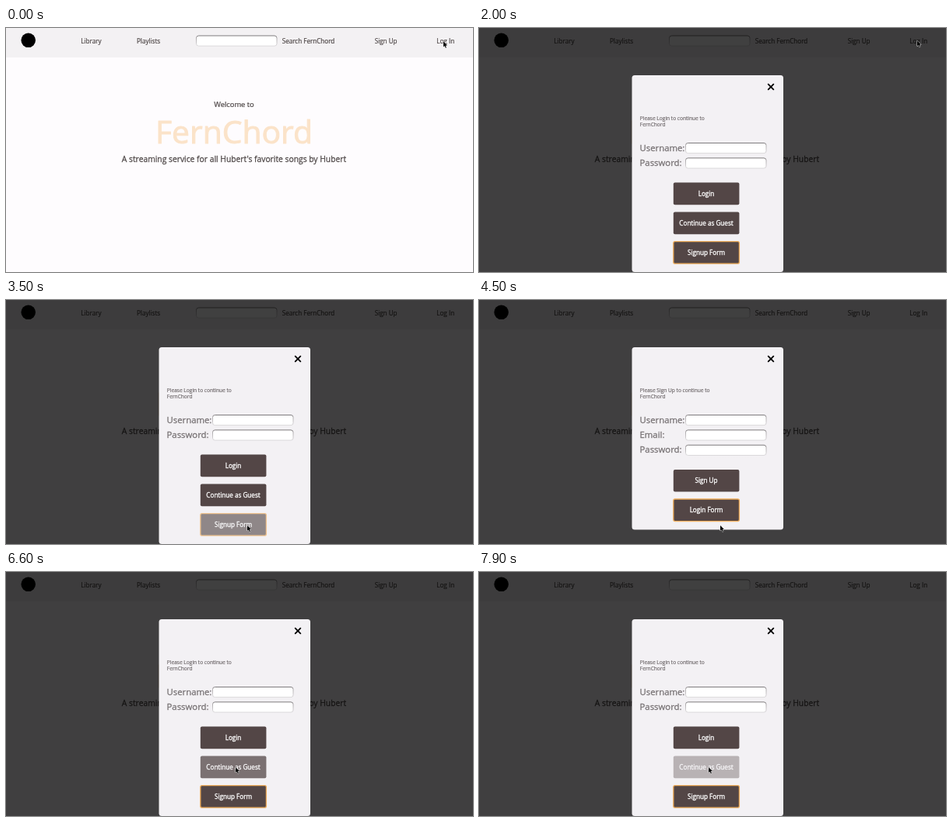
Animation of 600x315 px, one loop 8000 ms. Source, as an HTML page with a canvas:

```html
<!DOCTYPE html>
<html lang="en">
<head>
<meta charset="utf-8">
<title>Music site login</title>
<style>
  html, body { margin: 0; width: 100%; height: 100%; overflow: hidden; background: #fefcfe; }
  canvas { display: block; width: 600px; height: 315px; }
</style>
</head>
<body>
<canvas id="stage"></canvas>
<script>
const W = 600, H = 315, LOOP = 8000, STEP = 100;
const SITE = "FernChord", OWNER = "Hubert";
const FONT = "'Open Sans', 'Noto Sans', sans-serif";
const INK = "#4d4646", MUTED = "#6c6668", LABEL = "#767173";
const PANEL = "#f3f1f4", DARK = "#534646", ORANGE = "#f0ae5c", AMBER = "#f3ac32";
const OPEN = 2000, TO_SIGNUP = 3800, TO_LOGIN = 6200;
const ROW = 19.4, BUTTON_GAP = 38;
const BUTTON = { x: 249.8, w: 84.6, h: 28.6 };
const FADED = 0.37, FADE_TIME = 500;

const canvas = document.getElementById("stage");
const ctx = canvas.getContext("2d");
const ratio = window.devicePixelRatio || 1;
canvas.width = W * ratio;
canvas.height = H * ratio;
ctx.scale(ratio, ratio);
ctx.lineJoin = "round";

const home = { x: 562, y: 17.5 };
const moves = [
  { from: 100, to: 800, x: 563, y: 16.5 },
  { from: 2000, to: 2900, x: 314, y: 258 },
  { from: 2900, to: 3400, x: 310, y: 291 },
  { from: 4700, to: 5100, x: 293, y: 271 },
  { from: 5300, to: 5600, x: 297, y: 274 },
  { from: 6200, to: 6600, x: 295, y: 252 },
  { from: 6900, to: 7300, x: 295, y: 222 },
  { from: 7300, to: 7600, x: 295, y: 252 }
];

const clamp = v => Math.min(1, Math.max(0, v));
const ease = p => p * p * (3 - 2 * p);

function cursorAt(t) {
  let { x, y } = home;
  for (const m of moves) {
    const p = ease(clamp((t - m.from) / (m.to - m.from)));
    x += (m.x - x) * p;
    y += (m.y - y) * p;
  }
  return { x, y };
}

// A button fades while the cursor is over it and recovers afterwards.
function buttonOpacity(top, shownAt, t) {
  let level = 0;
  for (let s = shownAt; s < t; s += STEP) {
    const { x, y } = cursorAt(s);
    const over = x > BUTTON.x && x < BUTTON.x + BUTTON.w && y > top && y < top + BUTTON.h;
    level = clamp(level + (over ? STEP : -STEP) / FADE_TIME);
  }
  return 1 - level * (1 - FADED);
}

function mix(from, to, p) {
  const channel = (hex, i) => parseInt(hex.slice(1 + 2 * i, 3 + 2 * i), 16);
  const parts = [0, 1, 2].map(i =>
    Math.round(channel(from, i) + (channel(to, i) - channel(from, i)) * p));
  return `rgb(${parts.join(",")})`;
}

// A thin outline gives the letters a sturdier stem.
function text(str, x, y, size, color, align = "left", stem = 0.025) {
  ctx.font = `${size}px ${FONT}`;
  ctx.textAlign = align;
  ctx.fillStyle = ctx.strokeStyle = color;
  ctx.lineWidth = size * stem;
  ctx.fillText(str, x, y);
  ctx.strokeText(str, x, y);
}

function box(x, y, w, h, r, color) {
  ctx.beginPath();
  ctx.roundRect(x, y, w, h, r);
  ctx.fillStyle = color;
  ctx.fill();
}

function field(x, y) {
  box(x + 0.5, y + 0.5, 103.5, 13.2, 3, "#fff");
  const shade = ctx.createLinearGradient(0, y, 0, y + 14);
  shade.addColorStop(0, "#777476");
  shade.addColorStop(0.3, "#b2afb1");
  shade.addColorStop(1, "#dcdadc");
  ctx.strokeStyle = shade;
  ctx.lineWidth = 1;
  ctx.stroke();
}

function button(label, y, shownAt, t, outlined) {
  const opacity = buttonOpacity(y, shownAt, t);
  box(BUTTON.x, y, BUTTON.w, BUTTON.h, 2, mix(PANEL, DARK, opacity));
  if (outlined) {
    ctx.strokeStyle = mix(PANEL, ORANGE, Math.max(opacity, 0.65));
    ctx.lineWidth = 1.3;
    ctx.stroke();
  }
  text(label, 292, y + 17.2, 8.15, mix(PANEL, "#ffffff", opacity), "center", 0.04);
}

function drawPage(glow) {
  ctx.fillStyle = "#fefcfe";
  ctx.fillRect(0, 0, W, H);
  ctx.fillStyle = "#f3f1f3";
  ctx.fillRect(0, 0, W, 38);

  box(19.4, 6.5, 18.6, 18.6, 9.3, "#000");

  const nav = (label, x) => text(label, x, 19.7, 8.1, INK);
  nav("Library", 96.3);
  nav("Playlists", 168);
  nav("Search " + SITE, 354.7);
  nav("Sign Up", 473.7);
  field(244, 9.5);
  text("Log In", 553.2, 19.7, 8.15, mix(INK, AMBER, glow), "left", 0.025 + 0.04 * glow);

  text("Welcome to", 293, 101.5, 9.35, INK, "center");
  text(SITE, 293, 148.6, 40.8, "#fbe3c9", "center");
  text(`A streaming service for all ${OWNER}'s favorite songs by ${OWNER}`,
    293, 173, 10.32, INK, "center");
}

function drawModal(t) {
  const signup = t >= TO_SIGNUP && t < TO_LOGIN;
  const shownAt = signup ? TO_SIGNUP : t < TO_SIGNUP ? OPEN : TO_LOGIN;
  const labels = signup ? ["Username:", "Email:", "Password:"] : ["Username:", "Password:"];
  const buttons = signup ? ["Sign Up", "Login Form"] : ["Login", "Continue as Guest", "Signup Form"];

  ctx.fillStyle = "rgba(0,0,0,0.75)";
  ctx.fillRect(0, 0, W, H);
  box(196.5, 61, 194.5, signup ? 235.5 : 254, 3.5, PANEL);

  ctx.strokeStyle = "#000";
  ctx.lineWidth = 1.8;
  ctx.beginPath();
  for (const s of [-1, 1]) {
    ctx.moveTo(375 - 3.8, 76 - 3.8 * s);
    ctx.lineTo(375 + 3.8, 76 + 3.8 * s);
  }
  ctx.stroke();

  text(`Please ${signup ? "Sign Up" : "Login"} to continue to`, 206.8, 119.2, 6.6, MUTED);
  text(SITE, 206.8, 127, 6.6, MUTED);

  labels.forEach((label, i) => {
    text(label, 206.5, 158.6 + i * ROW, 11.35, LABEL);
    field(265, 148 + i * ROW);
  });

  const top = 160.8 + labels.length * ROW;
  buttons.forEach((label, i) =>
    button(label, top + i * BUTTON_GAP, shownAt, t, i === buttons.length - 1));
}

function drawCursor({ x, y }) {
  ctx.save();
  ctx.translate(x, y);
  const arrow = new Path2D("M0 0V7L1.6 5.6 2.8 8.2 3.9 7.7 2.8 5.2 4.9 5Z");
  ctx.strokeStyle = "rgba(255,255,255,0.85)";
  ctx.lineWidth = 1;
  ctx.stroke(arrow);
  ctx.fillStyle = "#000";
  ctx.fill(arrow);
  ctx.restore();
}

function draw(now) {
  const t = Math.floor((now % LOOP) / STEP) * STEP;
  const open = t >= OPEN;
  drawPage(open ? 0 : clamp((t - 1200) / 400));
  if (open) drawModal(t);
  drawCursor(cursorAt(t));
}

const start = performance.now();
function tick() {
  draw(performance.now() - start);
  requestAnimationFrame(tick);
}
tick();
</script>
</body>
</html>
```
